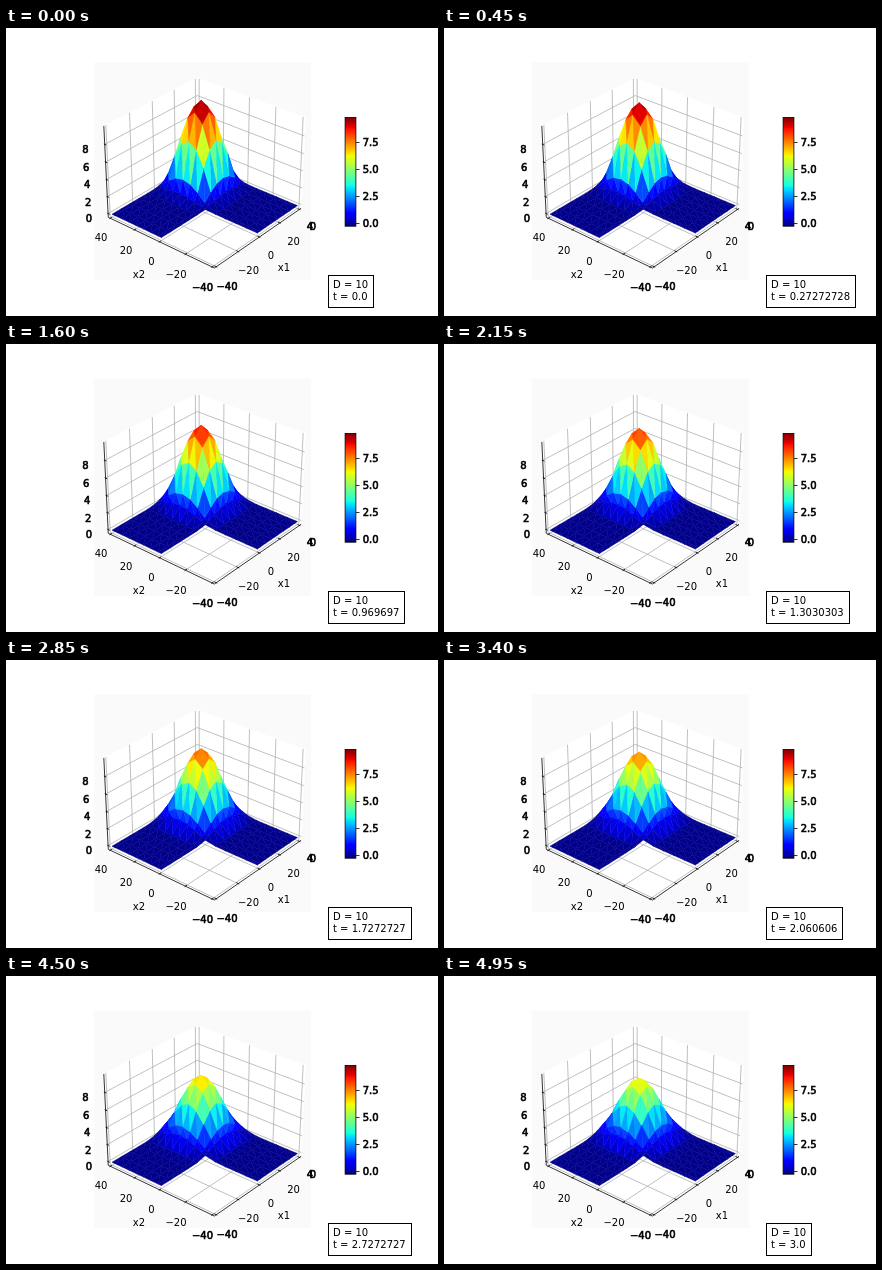
An HTML page with a canvas that plays this animation: 432 px wide and 288 px high, repeating every 5 s.

```html
<!DOCTYPE html>
<html lang="en">
<head>
<meta charset="utf-8">
<title>Diffusion surface</title>
<style>
  html, body { margin: 0; width: 100%; height: 100%; overflow: hidden; background: #fff; }
  svg, canvas { position: absolute; left: 0; top: 0; width: 432px; height: 288px; }
  text { font: 10px "DejaVu Sans", sans-serif; fill: #000; white-space: pre; }
  .heavy { stroke: #000; stroke-width: .6px; }
</style>
</head>
<body>
<svg id="plot" viewBox="0 0 432 288" width="432" height="288"></svg>
<canvas id="surface" width="432" height="288"></canvas>
<script>
const STEPS = 100, STEP_MS = 50, T_END = 3;
const svg = document.getElementById('plot');
const ctx = document.getElementById('surface').getContext('2d');

// Perspective camera: elevation 30, azimuth 220, distance 10
const rad = Math.PI / 180;
const [ce, se, ca, sa] = [Math.cos(30 * rad), Math.sin(30 * rad), Math.cos(220 * rad), Math.sin(220 * rad)];
const Z0 = -0.24, ZR = 10.07;

function project(x, y, z) {
  const a = x / 70, b = y / 70, c = ((z - Z0) / ZR - 0.5) * 0.8571;
  const h = a * ca + b * sa;
  const depth = 10 - h * ce - c * se;
  const k = 1175.4 / depth;
  return [199.3 + k * (b * ca - a * sa), 140.3 - k * (c * ce - h * se), depth];
}

function add(name, attrs, text) {
  const el = document.createElementNS('http://www.w3.org/2000/svg', name);
  for (const key in attrs) el.setAttribute(key, attrs[key]);
  if (text !== undefined) el.textContent = text;
  svg.appendChild(el);
  return el;
}
const path = pts => pts.map(p => project(...p).slice(0, 2).map(v => v.toFixed(2)).join()).join(' ');
const line = (pts, stroke, width = 0.8) =>
  add('polyline', { points: path(pts), fill: 'none', stroke, 'stroke-width': width });
const label = (s, x, y, heavy, anchor = 'middle') =>
  add('text', { x, y: y + 3.7, 'text-anchor': anchor, class: heavy ? 'heavy' : '' }, s);

// Jet colour map
const JET = [
  [[0, 0], [.35, 0], [.66, 1], [.89, 1], [1, .5]],
  [[0, 0], [.125, 0], [.375, 1], [.64, 1], [.91, 0], [1, 0]],
  [[0, .5], [.11, 1], [.34, 1], [.65, 0], [1, 0]]
];
function jet(v) {
  v = Math.min(1, Math.max(0, v));
  const rgb = JET.map(stops => {
    const i = Math.max(1, stops.findIndex(s => s[0] >= v));
    const [x0, y0] = stops[i - 1], [x1, y1] = stops[i];
    return Math.round(255 * (y0 + (y1 - y0) * (v - x0) / (x1 - x0)));
  });
  return `rgb(${rgb})`;
}

function drawAxes() {
  const E = 40 * 25 / 24, lo = Z0 - ZR / 48, hi = Z0 + ZR * 49 / 48;
  add('rect', { x: 87.7, y: 34.6, width: 217.4, height: 217.4, fill: '#fafafa' });
  const panes = [
    [[-E, -E, lo], [E, -E, lo], [E, E, lo], [-E, E, lo]],
    [[E, -E, lo], [E, E, lo], [E, E, hi], [E, -E, hi]],
    [[-E, E, lo], [E, E, lo], [E, E, hi], [-E, E, hi]]
  ];
  for (const p of panes) add('polygon', { points: path(p), fill: '#fff', stroke: '#fff', 'stroke-width': 0.8 });

  const ticks = [-40, -20, 0, 20, 40], zTicks = [0, 2, 4, 6, 8], grid = '#b0b0b0';
  for (const v of ticks) {
    line([[v, -E, lo], [v, E, lo], [v, E, hi]], grid);
    line([[-E, v, lo], [E, v, lo], [E, v, hi]], grid);
  }
  for (const v of zTicks) line([[-E, E, v], [E, E, v], [E, -E, v]], grid);

  line([[E, -E, lo], [-E, -E, lo], [-E, E, lo], [-E, E, hi]], '#000');
  for (const v of ticks) {
    line([[v, -E + 1.4, lo], [v, -E - .7, lo]], '#000');
    line([[-E + 1.4, v, lo], [-E - .7, v, lo]], '#000');
  }
  for (const v of zTicks) line([[-E, E - 1.4, v], [-E, E + .7, v]], '#000');

  zTicks.forEach((v, i) => label(v, 83 - i * .9, [190.5, 174, 156.5, 139, 121.5][i], true));
  label('40', 95, 209.5);
  label('20', 120, 222);
  label('0', 145.5, 233.5);
  label('\u221220', 170, 246.5);
  label('\u221240', 196.5, 259, true);
  label('\u221240', 221, 258.5, true);
  label('\u221220', 242.5, 242.5);
  label('0', 265, 227.5);
  label('20', 287.5, 213);
  label('4', 304, 198.5, true);
  label('0', 307, 198.5, true);
  label('x2', 133, 246.5);
  label('x1', 278, 239.5);
}

function drawColorbar() {
  const grad = add('linearGradient', { id: 'jet', x1: 0, y1: 1, x2: 0, y2: 0 });
  for (let i = 0; i <= 64; i++) {
    const stop = add('stop', { offset: i / 64, 'stop-color': jet(i / 64) });
    grad.appendChild(stop);
  }
  add('rect', { x: 339.1, y: 89.4, width: 10.8, height: 108.8, fill: 'url(#jet)', stroke: '#000', 'stroke-width': 0.8 });
  ['0.0', '2.5', '5.0', '7.5'].forEach((s, i) => {
    const y = 195.5 - 27 * i;
    add('line', { x1: 350, x2: 353.5, y1: y, y2: y, stroke: '#000', 'stroke-width': 0.8 });
    label(s, 356.7, y, true, 'start');
  });
}

// Mesh lines along each axis: coarse over the flat part, finer over the hump
const lines = [];
for (let v = -40; v <= 0; v += 8) lines.push(v);
for (let k = -3; k <= 3; k++) lines.push(20 + 5.8 * k);
lines.push(40);

// L-shaped set of triangles, each corner an [i, j] pair of mesh lines
const tris = [];
for (let i = 0; i < lines.length - 1; i++) {
  for (let j = 0; j < lines.length - 1; j++) {
    if (lines[i] < 0 && lines[j] < 0) continue;
    const a = [i, j], b = [i + 1, j], c = [i + 1, j + 1], d = [i, j + 1];
    tris.push([a, b, c], [a, c, d]);
  }
}

// Half-wave hump on 0..40, blurred by a Gaussian
const hump = u => u > 0 && u < 40 ? Math.sin(Math.PI * u / 40) : 0;
function blurred(u, sigma) {
  let sum = 0, total = 0;
  for (let s = -3; s <= 3; s += 0.25) {
    const w = Math.exp(-s * s / 2);
    sum += w * hump(u + s * sigma);
    total += w;
  }
  return sum / total;
}

const FLOOR = -0.1;
function drawSurface(t) {
  const height = 10 * (1 - 0.1 * t - 0.005 * t * t) - FLOOR;
  const sigma = Math.sqrt(4 + 12 * t);
  const top = blurred(20, sigma);
  const profile = lines.map(u => blurred(u, sigma) / top);
  const verts = lines.map((x, i) => lines.map((y, j) => {
    const z = FLOOR + height * profile[i] * profile[j];
    return [...project(x, y, z), z];
  }));
  const faces = tris.map(tri => {
    const v = tri.map(([i, j]) => verts[i][j]);
    const mean = k => (v[0][k] + v[1][k] + v[2][k]) / 3;
    return { v, depth: mean(2), z: mean(3) };
  }).sort((p, q) => q.depth - p.depth);

  ctx.clearRect(0, 0, 432, 288);
  ctx.lineWidth = 0.5;
  ctx.lineJoin = 'round';
  for (const { v, z } of faces) {
    ctx.fillStyle = ctx.strokeStyle = jet((z + 0.2) / 9.8);
    ctx.beginPath();
    v.forEach(p => ctx.lineTo(p[0], p[1]));
    ctx.closePath();
    ctx.fill();
    ctx.stroke();
  }
}

// Shortest decimal that gives the same single-precision value
function floatText(t) {
  const f = Math.fround(t);
  for (let p = 1; p <= 9; p++) {
    const n = Number(f.toPrecision(p));
    if (Math.fround(n) === f) return Number.isInteger(n) ? n.toFixed(1) : String(n);
  }
}

drawAxes();
drawColorbar();
const box = add('rect', { x: 322.5, y: 247.5, height: 32, fill: '#fff', stroke: '#000', 'stroke-width': 1 });
const first = add('text', { x: 327, y: 260 }, 'D = 10');
const second = add('text', { x: 327, y: 272 }, '');

let shown = -1;
function tick() {
  const step = Math.floor(performance.now() / STEP_MS) % STEPS;
  if (step !== shown) {
    shown = step;
    const t = T_END * step / (STEPS - 1);
    drawSurface(t);
    second.textContent = 't = ' + floatText(t);
    const width = Math.max(first.getComputedTextLength(), second.getComputedTextLength());
    box.setAttribute('width', Math.round(width + 9.8));
  }
  requestAnimationFrame(tick);
}
tick();
</script>
</body>
</html>
```
